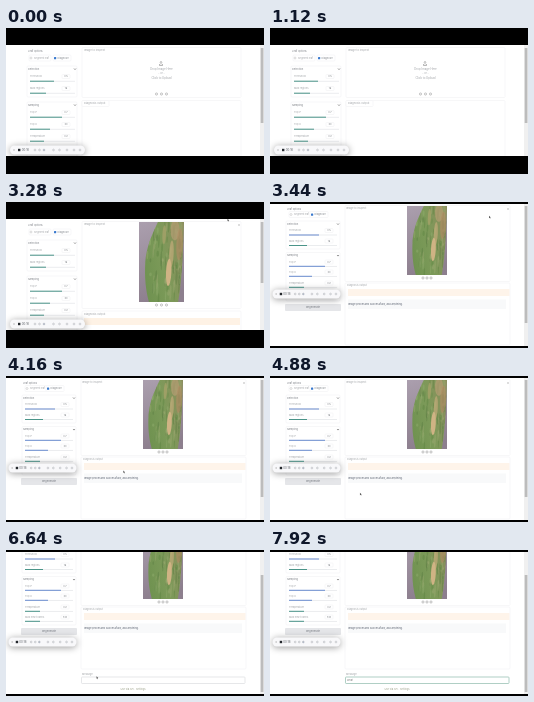
Animation of 258x146 px, one loop 8000 ms. Source, as an HTML page with a canvas:

```html
<!DOCTYPE html>
<html lang="en">
<head>
<meta charset="utf-8">
<title>Leaf analysis demo</title>
<style>
html, body { margin: 0; width: 100%; height: 100%; overflow: hidden; background: #000; }
canvas { display: block; width: 258px; height: 146px; }
</style>
</head>
<body>
<canvas id="stage" width="258" height="146"></canvas>
<script>
const ctx = document.getElementById('stage').getContext('2d');
const LOOP = 8000, UPLOAD = 1840, RESIZE = 3360;
const TEAL = '#4a9489', BLUE = '#6c8ed0', GREY = '#9fa2a6', LINE = '#eeeff1';

const clamp = v => Math.max(0, Math.min(1, v));
const ease = v => { v = clamp(v); return v * v * (3 - 2 * v); };

function seeded(seed) {
  return () => (seed = (seed * 16807) % 2147483647) / 2147483647;
}

function rect(x, y, w, h, color) {
  ctx.fillStyle = color;
  ctx.fillRect(x, y, w, h);
}

function box(x, y, w, h, r, fill, stroke, lineWidth = 0.5) {
  ctx.beginPath();
  ctx.roundRect(x, y, w, h, r);
  if (fill) { ctx.fillStyle = fill; ctx.fill(); }
  if (stroke) { ctx.strokeStyle = stroke; ctx.lineWidth = lineWidth; ctx.stroke(); }
}

function label(str, x, y, size = 2.8, color = GREY, align = 'left') {
  ctx.font = `${size}px Inter, sans-serif`;
  ctx.textAlign = align;
  ctx.textBaseline = 'middle';
  ctx.fillStyle = color;
  ctx.fillText(str, x, y);
}

function dot(x, y, r, color) {
  ctx.beginPath();
  ctx.arc(x, y, r, 0, Math.PI * 2);
  ctx.fillStyle = color;
  ctx.fill();
}

function path(points, color, width = 0.6) {
  ctx.beginPath();
  points.forEach(([x, y]) => ctx.lineTo(x, y));
  ctx.strokeStyle = color;
  ctx.lineWidth = width;
  ctx.stroke();
}

function closeIcon(x, y) {
  path([[x - 0.8, y - 0.8], [x + 0.8, y + 0.8]], '#aaa', 0.5);
  path([[x + 0.8, y - 0.8], [x - 0.8, y + 0.8]], '#aaa', 0.5);
}

function sourceIcons(x, y, gap) {
  for (let i = -1; i <= 1; i++) box(x + i * gap - 1, y - 1, 2, 2, 0.8, null, '#999', 0.6);
}

function streak(x, y, rx, ry, color) {
  ctx.beginPath();
  ctx.ellipse(x, y, rx, ry, 0.09, 0, Math.PI * 2);
  ctx.fillStyle = color;
  ctx.fill();
}

function photo(x, y, w, h) {
  ctx.save();
  ctx.beginPath();
  ctx.rect(x, y, w, h);
  ctx.clip();
  ctx.translate(x, y);
  ctx.scale(w, h);
  const back = ctx.createLinearGradient(0, 0, 0.2, 1);
  back.addColorStop(0, '#ab9fae');
  back.addColorStop(1, '#8d7f8e');
  rect(0, 0, 1, 1, back);

  const leaf = ctx.createLinearGradient(0.1, 0.7, 1, 0.4);
  leaf.addColorStop(0, '#6f9250');
  leaf.addColorStop(0.5, '#7c9a59');
  leaf.addColorStop(1, '#8a8f5c');
  ctx.beginPath();
  ctx.moveTo(0.42, 0);
  ctx.bezierCurveTo(0.28, 0.17, 0.17, 0.3, 0.14, 0.5);
  ctx.bezierCurveTo(0.12, 0.7, 0.15, 0.85, 0.22, 1);
  ctx.lineTo(0.87, 1);
  ctx.bezierCurveTo(0.95, 0.75, 0.98, 0.4, 1, 0);
  ctx.closePath();
  ctx.fillStyle = leaf;
  ctx.fill();
  ctx.clip();

  const random = seeded(71);
  const tones = ['#57803d66', '#94b07066', '#a9ad7c55', '#4f713b55'];
  for (let i = 0; i < 90; i++) {
    streak(0.12 + random() * 0.86, random(), 0.01 + random() * 0.02, 0.02 + random() * 0.08, tones[i % 4]);
  }
  streak(0.8, 0.1, 0.1, 0.13, '#b9a075aa');
  streak(0.9, 0.28, 0.07, 0.2, '#b08e63aa');
  streak(0.56, 0.16, 0.04, 0.12, '#b3a56f99');
  streak(0.72, 0.4, 0.05, 0.17, '#c7ab7caa');
  streak(0.66, 0.63, 0.06, 0.17, '#cfb384');
  ctx.restore();
}

function slider(x, y, width, filled, color) {
  rect(x, y - 0.35, width, 0.7, '#e2e4e7');
  rect(x, y - 0.5, filled, 1, color);
}

function setting(name, x, y, value, valueX, gap, width, filled, color) {
  label(name, x, y, 2.5);
  box(valueX - 4, y - 2, 8, 4, 0.7, '#fff', LINE);
  label(value, valueX, y, 2.4, '#75797e', 'center');
  slider(x, y + gap, width, filled, color);
}

function section(name, x, y, right, bottom) {
  box(x - 1, y - 3, right - x + 2, bottom - y + 3, 1, '#fff', LINE);
  label(name, x, y, 2.5, '#777b80');
  path([[right - 2, y - 0.5], [right - 1, y + 0.6], [right, y - 0.5]], '#555', 0.6);
}

function choices(x, y, gap) {
  box(x - 2, y - 3, 22, 6, 1, '#fff', LINE);
  box(x - 1, y - 1, 2, 2, 1, '#fff', '#bbb');
  label('Segment leaf', x + 3, y, 2.4);
  box(x + gap - 2, y - 3, 18, 6, 1, '#fff', LINE);
  box(x + gap - 1, y - 1, 2.2, 2.2, 0.5, '#3979ce');
  label('Diagnose', x + gap + 2.5, y, 2.5, '#7d8288');
}

function scrollbar(top, height, y, length) {
  rect(254, top, 4, height, '#f0f0f0');
  rect(254.7, y, 2.7, length, '#bcbcbc');
}

function toolbar(x, y, width) {
  ctx.save();
  ctx.shadowColor = '#0006';
  ctx.shadowBlur = 7;
  ctx.shadowOffsetY = 1;
  box(x, y, width, 9, 4.5, '#f8f8fa');
  ctx.restore();
  const scale = width / 75, mid = y + 4.5;
  const at = offset => x + offset * scale;
  dot(at(4), mid, 0.7, '#aaa');
  rect(at(8), mid - 1.2, 2.4, 2.4, '#24282d');
  label('00:16', at(11.8), mid, 2.8, '#55595f');
  [25, 29.5, 34, 43.5, 49.5, 57, 64, 70].forEach((offset, i) => {
    box(at(offset) - 0.8, mid - 0.8, 1.6, 1.6, 0.6, i === 2 ? '#b4bfd3' : null, '#a0a5ab', 0.5);
  });
}

function cursor(x, y) {
  ctx.beginPath();
  [[-0.5, -1.3], [-0.5, 1.2], [0.1, 0.7], [0.6, 1.6], [1, 1.3], [0.6, 0.5], [1.3, 0.4]]
    .forEach(([dx, dy]) => ctx.lineTo(x + dx, y + dy));
  ctx.closePath();
  ctx.fillStyle = '#555';
  ctx.fill();
}

// Runs a page painter clipped to the white area between the black bars.
function page(top, height, paint) {
  rect(0, top, 258, height, '#fff');
  ctx.save();
  ctx.beginPath();
  ctx.rect(0, top, 258, height);
  ctx.clip();
  paint();
  ctx.restore();
}

function compactPage(t) {
  const loaded = t >= UPLOAD;
  label('Leaf options', 22, 23.5, 2.5, '#777b80');
  choices(25, 30, 24);
  section('Detection', 22, 41, 70, 69);
  setting('Threshold', 24, 48.5, '0.5', 60, 4.7, 45, 24, TEAL);
  setting('Max regions', 24, 60.5, '16', 60, 4.7, 45, 16, TEAL);
  section('Sampling', 22, 77, 70, 129);
  setting('Top P', 24, 84.5, '0.7', 60, 4.7, 45, 32, TEAL);
  setting('Top K', 24, 96.5, '40', 60, 4.7, 45, 20, TEAL);
  setting('Temperature', 24, 108.5, '0.2', 60, 4.7, 45, 14, TEAL);

  box(76, 19.5, 159, loaded ? 87 : 50, 1, '#fff', LINE);
  label('Image to inspect', 78, 22.5, 2.7);
  if (loaded) {
    photo(133, 20, 45, 80);
    sourceIcons(155.5, 103, 5);
    closeIcon(233, 23);
    box(76, 109, 159, 20, 1, '#fff', LINE);
    label('Diagnosis output', 78, 112, 2.7);
    rect(78, 116, 156, 7, '#fef2e5');
  } else {
    path([[153.5, 36], [153.5, 37.5], [156.5, 37.5], [156.5, 36]], '#888');
    path([[155, 36.5], [155, 33.5], [154, 34.5]], '#888');
    path([[155, 33.5], [156, 34.5]], '#888');
    label('Drop Image Here', 155.5, 41.5, 2.8, GREY, 'center');
    label('- or -', 155.5, 45.7, 2.6, GREY, 'center');
    label('Click to Upload', 155.5, 50, 2.8, GREY, 'center');
    sourceIcons(155.5, 66, 5);
    box(76, 72.5, 159, 60, 1, '#fff', LINE);
    box(76, 72.5, 27, 6, 1, '#fff', LINE);
    label('Diagnosis output', 78, 75.5, 2.7);
  }
  scrollbar(17, 111, 20, loaded ? 61 : 75);
  toolbar(4, 117.5, 75);
}

function fullPage(t) {
  const progress = ease((t - 5280) / 180);
  ctx.save();
  ctx.translate(0, -24 * progress);
  label('Leaf options', 17, 7, 2.4, '#777b80');
  choices(21, 12.5, 21);
  section('Detection', 17, 22, 69, 47);
  setting('Threshold', 19, 28.5, '0.5', 59, 4.5, 48, 30, BLUE);
  setting('Max regions', 19, 39, '16', 59, 4.5, 48, 18, TEAL);
  section('Sampling', 17, 53.5, 69, 99);
  setting('Top P', 19, 60, '0.7', 59, 4.3, 48, 36, BLUE);
  setting('Top K', 19, 70, '40', 59, 4.3, 48, 23, BLUE);
  setting('Temperature', 19, 81, '0.2', 59, 4.3, 48, 15, TEAL);
  setting('Max new tokens', 19, 91, '512', 59, 4.3, 48, 15, TEAL);
  box(15, 102, 56, 7, 1, '#e5e6e9');
  label('Regenerate', 43, 105.5, 2.6, '#72777e', 'center');

  box(75, 3.5, 165, 76, 1, '#fff', LINE);
  label('Image to inspect', 76, 6.5, 2.6);
  closeIcon(238, 7);
  photo(137, 4, 40, 69);
  sourceIcons(157, 76, 4);
  box(75, 81, 165, 62, 1, '#fff', LINE);
  label('Diagnosis output', 77, 83.5, 2.5);
  rect(78, 87, 161.5, 7, '#fef4ea');
  rect(78, 97.5, 158, 9.5, '#f8f9fa');
  label('Image processed successfully, ask anything.', 78, 102, 2.6, '#565e6c');

  label('Message', 76, 148.5, 2.5);
  const focused = t >= 6800;
  box(75.5, 151, 163.5, 6.5, 0.7, '#fff', focused ? '#8ebaad' : '#dcdde0', 0.7);
  const count = Math.floor(clamp((t - 7120) / 640) * 4);
  label('What'.slice(0, count), 77, 154.2, 2.4, '#777');
  label('Use via API · Settings', 127, 163.3, 2.5, '#9a9f88', 'center');
  ctx.restore();
  scrollbar(2, 142, 4 + 21 * progress, 117);
  toolbar(2.5, 87.5, 68);
}

const moves = [
  [1840, 213, 23], [2400, 213, 23], [2800, 222, 18], [3300, 222, 18],
  [3440, 219.5, 15], [3600, 219.5, 15], [4400, 90, 118], [5440, 91, 118],
  [6240, 91, 118], [6800, 91, 130], [7080, 91, 130]
];

function drawCursor(t) {
  const next = moves.findIndex(([time]) => time > t);
  if (next < 1) return;
  const [start, x, y] = moves[next - 1];
  const [end, nextX, nextY] = moves[next];
  const amount = ease((t - start) / (end - start));
  cursor(x + (nextX - x) * amount, y + (nextY - y) * amount);
}

function draw(now) {
  const t = now % LOOP;
  rect(0, 0, 258, 146, '#000');
  if (t < RESIZE) page(17, 111, () => compactPage(t));
  else page(2, 142, () => fullPage(t));
  drawCursor(t);
}

const begin = performance.now();
function frame() {
  draw(performance.now() - begin);
  requestAnimationFrame(frame);
}
frame();
</script>
</body>
</html>
```
